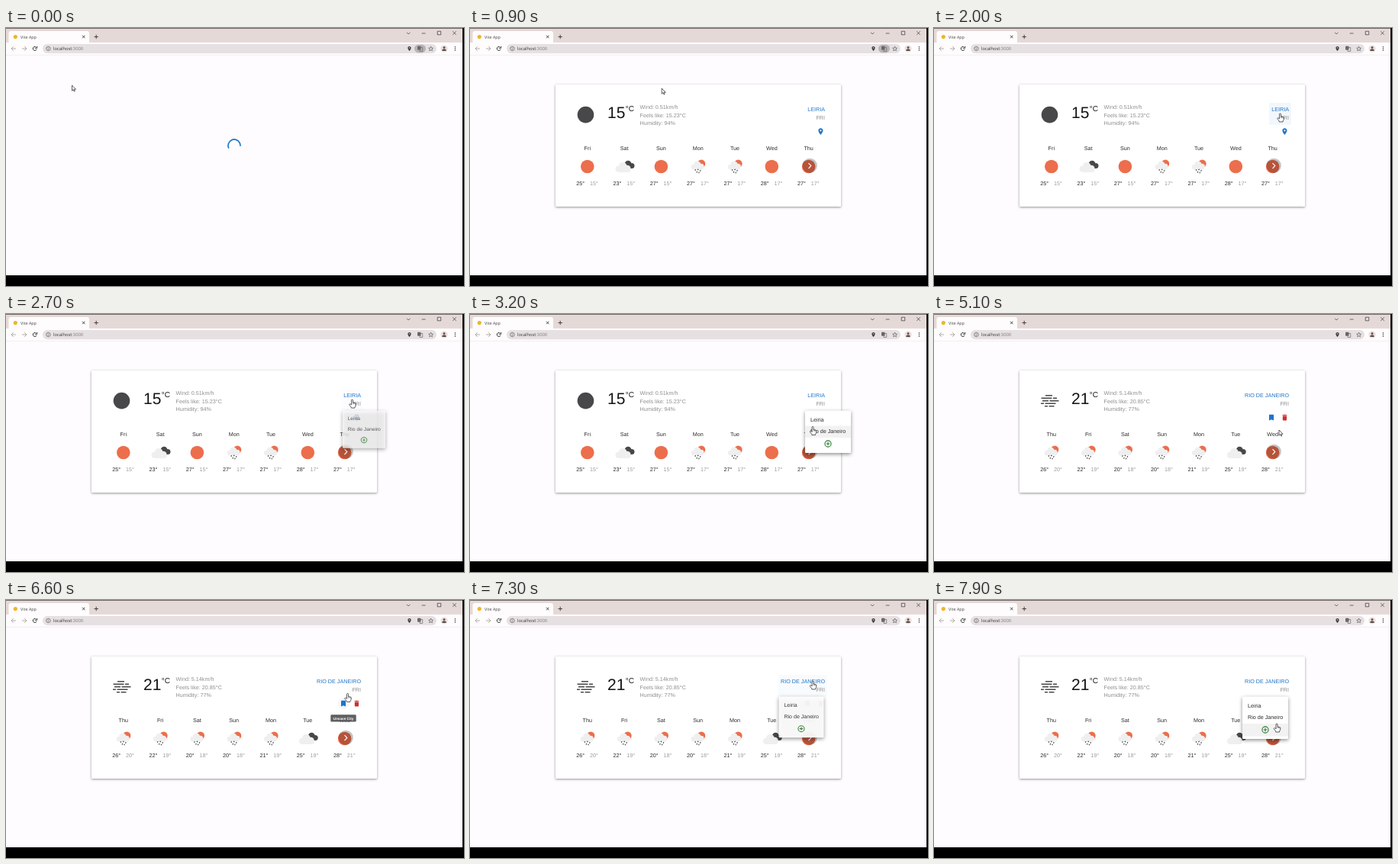
These frames come from a looping animation (600 by 338 pixels, 8 s). An HTML page with a canvas:

```html
<!DOCTYPE html>
<html lang="en">
<head>
<meta charset="utf-8">
<title>Weather</title>
<style>
html, body { margin: 0; width: 100%; height: 100%; overflow: hidden; background: #000; }
canvas { display: block; width: 600px; height: 338px; }
</style>
</head>
<body>
<canvas></canvas>
<script>
const LOOP = 8000, SANS = '"Liberation Sans", Arial, sans-serif', UI = '"Open Sans", sans-serif';
const BLUE = '#1f74c8', SUN = '#ec6e4c', DARK = '#48484a', GREY = '#8e8e90', INK = '#2b2b2d';
const canvas = document.querySelector('canvas'), ctx = canvas.getContext('2d');
const dpr = window.devicePixelRatio || 1;
canvas.width = 600 * dpr;
canvas.height = 338 * dpr;
ctx.textRendering = 'geometricPrecision';

const PIN = new Path2D('M12 2C8.1 2 5 5.1 5 9c0 5.3 7 13 7 13s7-7.7 7-13c0-3.9-3.1-7-7-7zm0 9.5a2.5 2.5 0 0 1 0-5 2.5 2.5 0 0 1 0 5z');
const BOOKMARK = new Path2D('M17 3H7c-1.1 0-2 .9-2 2v16l7-3 7 3V5c0-1.1-.9-2-2-2z');
const TRASH = new Path2D('M6 19c0 1.1.9 2 2 2h8c1.1 0 2-.9 2-2V7H6zM19 4h-3.5l-1-1h-5l-1 1H5v2h14z');
const STAR = new Path2D('M12 3l2.7 6.2 6.8.6-5.1 4.5 1.5 6.6-5.9-3.5-5.9 3.5 1.5-6.6L2.5 9.8l6.8-.6z');
const ARROW = new Path2D('M0 0v7.2l1.7-1.5 1.1 2.4 1-.4-1.1-2.4h2.3z');
const HAND = new Path2D('M-1 1a1 1 0 0 1 2 0v3l3 .7q1 .3.9 1.3l-.5 2.7-.9 1.3v1H-1.2l-.2-1.2-2-2.5q-.7-1 .1-1.5.8-.4 1.5.4l.8.8z');

const cities = [
  { name: 'Leiria', temp: 15, info: ['Wind: 0.51km/h', 'Feels like: 15.23°C', 'Humidity: 94%'], first: 5,
    sky: ['sun', 'cloud', 'sun', 'rain', 'rain', 'sun', 'sun'],
    high: [25, 23, 27, 27, 27, 28, 27], low: [15, 15, 15, 17, 17, 17, 17], left: 439 },
  { name: 'Rio de Janeiro', temp: 21, info: ['Wind: 5.14km/h', 'Feels like: 20.85°C', 'Humidity: 77%'], first: 4,
    sky: ['rain', 'rain', 'rain', 'rain', 'rain', 'cloud', 'sun'],
    high: [26, 22, 20, 20, 21, 25, 28], low: [20, 19, 18, 18, 19, 19, 21], left: 404 },
];
const DAYS = ['Sun', 'Mon', 'Tue', 'Wed', 'Thu', 'Fri', 'Sat'];

// time, x, y of the pointer's hot spot
const path = [
  [100, 86.5, 75], [900, 251, 79], [1800, 453.5, 111], [2000, 453.5, 112], [2700, 453.5, 112],
  [3200, 449, 147.5], [3600, 452, 152], [5100, 452, 152], [5900, 444, 132], [6100, 444, 133],
  [6500, 444, 133], [6600, 447.5, 122.5], [6850, 449, 106], [7350, 449, 106], [7900, 449, 162],
];

const clamp = v => Math.max(0, Math.min(1, v));
const ramp = (t, from, to) => clamp((t - from) / (to - from));
const smooth = v => v * v * (3 - 2 * v);

function pointer(t) {
  const i = path.findIndex(k => k[0] > t);
  if (i === 0) return path[0].slice(1);
  if (i < 0) return path.at(-1).slice(1);
  const [a, b] = [path[i - 1], path[i]], p = ramp(t, a[0], b[0]);
  return [1, 2].map(n => a[n] + (b[n] - a[n]) * p);
}

function text(str, x, y, size, color, align = 'left', family = SANS, weight = 400) {
  ctx.font = `${weight} ${size}px ${family}`;
  ctx.textAlign = align;
  ctx.fillStyle = color;
  ctx.fillText(str, x, y);
}
function rect(x, y, w, h, color, r = 0) {
  ctx.fillStyle = color;
  ctx.beginPath();
  ctx.roundRect(x, y, w, h, r);
  ctx.fill();
}
function disc(x, y, r, color) {
  ctx.fillStyle = color;
  ctx.beginPath();
  ctx.arc(x, y, r, 0, 7);
  ctx.fill();
}
function stroke(d, color, width = 0.8) {
  ctx.strokeStyle = color;
  ctx.lineWidth = width;
  ctx.stroke(new Path2D(d));
}
function ring(x, y, r, color, width = 0.8, from = 0, to = 2 * Math.PI) {
  ctx.strokeStyle = color;
  ctx.lineWidth = width;
  ctx.beginPath();
  ctx.arc(x, y, r, from, to);
  ctx.stroke();
}
function icon(shape, x, y, size, color, outline) {
  ctx.save();
  ctx.translate(x - size / 2, y - size / 2);
  ctx.scale(size / 24, size / 24);
  ctx.fillStyle = ctx.strokeStyle = color;
  ctx.lineWidth = 2;
  outline ? ctx.stroke(shape) : ctx.fill(shape, 'evenodd');
  ctx.restore();
}
function paper(x, y, w, h, blur, alpha) {
  ctx.save();
  ctx.shadowColor = `rgba(0,0,0,${alpha})`;
  ctx.shadowBlur = blur * dpr;
  ctx.shadowOffsetY = blur / 3 * dpr;
  rect(x, y, w, h, '#fff', 1.3);
  ctx.restore();
}

function browser(t) {
  rect(0, 0, 598, 324, '#fefcfe');
  rect(0, 0, 598, 19, '#e5d9d7');
  rect(0, 0, 598, 0.8, '#4a4444');
  rect(3.5, 4, 105.5, 16, '#fefcfd', [3, 3, 0, 0]);
  rect(0, 19, 598, 16.3, '#fefcfd');
  rect(0, 35, 598, 0.6, '#e6e3e5');
  disc(12.3, 11.6, 2.6, '#f0b52c');
  text('Vite App', 19, 13.6, 5.4, '#4a4648', 'left', UI);
  stroke('M100 9.8l3.4 3.4m0-3.4l-3.4 3.4', '#333', 0.9);
  stroke('M115.5 11.5h5.4m-2.7-2.7v5.4', '#333', 0.9);
  stroke('M525 5.8l2.2 2.2 2.2-2.2M544.7 7h4.8M565.2 4.3h4.5v4.5h-4.5zM585.2 4.3l4.6 4.6m0-4.6l-4.6 4.6', '#333', 0.7);
  stroke('M13 27H7m2.8-2.8L7 27l2.8 2.8M21 27h6m-2.8-2.8L27 27l-2.8 2.8', '#a5a1a3', 0.9);
  ring(37.8, 27, 2.5, '#333', 1, 0.4, 5.5);
  stroke('M40.7 23.8v2.6h-2.6', '#333', 0.9);
  rect(48, 21, 516, 12.2, '#e6e0e2', 6.1);
  ring(55.4, 27, 2.7, '#5a5658', 0.7);
  stroke('M55.4 26.6v1.9m0-3.1v.7', '#5a5658', 0.7);
  text('localhost', 62, 29, 5.8, '#333032', 'left', UI);
  const w = ctx.measureText('localhost').width;
  text(':3000', 62 + w, 29, 5.8, '#7d787a', 'left', UI);
  icon(PIN, 528.5, 27, 7.5, '#3c3a3b');
  if (t < 1400) rect(535, 21.8, 15, 10.6, '#b9b3b5', 5.3);
  rect(539, 23.8, 4.5, 5, '#6b6769', 0.7);
  stroke('M542 25.5h3.7v5h-3.7z', '#6b6769', 0.7);
  icon(STAR, 556.6, 27, 7.5, '#4a4648', true);
  disc(574, 27, 4.6, '#eadfdd');
  disc(574, 25.6, 1.4, '#5b4a48');
  rect(571.4, 27.5, 5.2, 2.4, '#5b4a48', [1.8, 1.8, 0, 0]);
  for (const y of [24.8, 27, 29.2]) disc(588.4, y, 0.75, '#444');
}

function spinner(t) {
  const p = (t / 1400 + 0.335) % 1, unit = 2 * Math.PI / 126.9;
  const grow = smooth(clamp(p * 2)), slide = smooth(clamp(p * 2 - 1));
  const skip = 15 * grow + 110 * slide;
  const end = Math.min(126.9, skip + 1 + 99 * grow);
  const turn = p * 2 * Math.PI;
  ring(299, 154, 8, '#1976c8', 1.7, turn + skip * unit, turn + end * unit);
}

function cloud(x, y, s, color) {
  disc(x - 5.5 * s, y + 2 * s, 4 * s, color);
  disc(x, y - 1.5 * s, 5.5 * s, color);
  disc(x + 6 * s, y + 1.5 * s, 4.5 * s, color);
  rect(x - 6 * s, y, 12 * s, 6 * s, color);
}
const weather = {
  sun: c => disc(c, 181.5, 8.8, SUN),
  cloud(c) {
    cloud(c + 5, 179.3, 0.8, DARK);
    cloud(c - 2, 182.8, 1, '#f0eff0');
    rect(c - 9, 184, 17, 5, '#f0eff0', 2);
  },
  rain(c) {
    disc(c + 4.4, 177.8, 5.2, SUN);
    cloud(c - 1, 180.4, 0.85, '#f0eff0');
    for (const [x, y] of [[-3.5, 186], [0, 185.5], [3, 187], [-1.5, 188.7], [1.2, 189.6]])
      stroke(`M${c + x + 0.5} ${y - 0.6}l-.9 1.2`, INK, 1.1);
  },
};

function card(city, hover) {
  paper(112, 74, 374, 160, 3.2, 0.42);
  if (city.temp === 15) disc(151.5, 113.6, 10.8, DARK);
  else stroke('M146 106.7h9M140.5 110.2h14m1.5 0h5M142 113.7h8m1.5 0h12M140 117.2h4m1.5 0h14M145 120.7h4m1.5 0h7', DARK, 1.4);
  text(city.temp, 180, 118.3, 21, '#151517');
  text('°C', 203.8, 109, 10, '#151517');
  city.info.forEach((line, i) => text(line, 222.5, 106 + 10.7 * i, 7.2, GREY));

  rect(city.left, 98, 468 - city.left, 29, `rgba(25,118,210,${0.06 * hover})`, 1.3);
  text(city.name.toUpperCase(), 465, 108.6, 7.2, BLUE, 'right');
  text('FRI', 465, 120.2, 7.2, GREY, 'right');
  if (city.temp === 15) icon(PIN, 459.4, 135.6, 10.5, BLUE);

  city.sky.forEach((sky, i) => {
    const c = 153.8 + 48.3 * i;
    text(DAYS[(city.first + i) % 7], c, 159.6, 7.2, INK, 'center');
    weather[sky](c);
    text(city.high[i] + '°', c - 14.6, 206.3, 7.2, INK);
    text(city.low[i] + '°', c + 3.2, 206.3, 7.2, '#9c9c9e');
  });
  disc(445.2, 180.4, 9.6, 'rgba(0,0,0,.23)');
  stroke('M443.5 177.2l3.3 3.4-3.3 3.4', '#fff', 1.1);
}

function actions(hover, tip) {
  disc(442, 135.6, 7.5, `rgba(25,118,210,${0.05 * hover})`);
  icon(BOOKMARK, 442, 135.6, 10.4, BLUE);
  icon(TRASH, 459.4, 135.6, 10.4, '#d32f2f');
  ctx.globalAlpha = tip;
  rect(425.3, 150.2, 33.4, 9.4, '#5f5f61', 1.3);
  text('Unsave City', 442, 156.6, 4.7, '#fff', 'center', SANS, 700);
  ctx.globalAlpha = 1;
}

function menu(left, open, y) {
  if (!open) return;
  ctx.save();
  ctx.globalAlpha = open;
  ctx.translate(left + 30, 126.5);
  ctx.scale(0.75 + 0.25 * open, 0.56 + 0.44 * open);
  ctx.translate(-left - 30, -126.5);
  paper(left, 126.5, 60, 55.5, 5, 0.45);
  const row = [130.5, 146.5, 162, 178.5], i = row.findIndex((top, n) => y >= top && y < row[n + 1]);
  if (i >= 0) rect(left, row[i], 60, row[i + 1] - row[i], '#f3f2f3');
  cities.forEach((city, n) => text(city.name, left + 7, 140.6 + 15.8 * n, 7.2, INK));
  ring(left + 30, 170, 4.1, '#2e7d32', 1.1);
  stroke(`M${left + 27.7} 170h4.6m-2.3-2.3v4.6`, '#2e7d32', 1.1);
  ctx.restore();
}

function cursor(x, y, hand) {
  ctx.save();
  ctx.translate(x, y);
  const shape = hand ? HAND : ARROW;
  ctx.fillStyle = '#fff';
  ctx.strokeStyle = '#2a2a2c';
  ctx.lineWidth = 0.75;
  ctx.fill(shape);
  ctx.stroke(shape);
  if (hand) stroke('M1 4v2.2M2.5 4.5v1.8M3.9 4.9v1.5', '#2a2a2c', 0.45);
  ctx.restore();
}

function draw() {
  const t = performance.now() % LOOP;
  const [x, y] = pointer(t);
  ctx.setTransform(dpr, 0, 0, dpr, 0, 0);
  rect(0, 0, 600, 338, '#000');
  browser(t);
  if (t < 500 || (t >= 4400 && t < 4800)) spinner(t);
  else if (t < 4400) card(cities[0], ramp(t, 1750, 2000) - ramp(t, 2500, 2750));
  else {
    card(cities[1], ramp(t, 6600, 6850) - ramp(t, 7100, 7500));
    actions(ramp(t, 5600, 5850) - ramp(t, 6600, 6800), ramp(t, 5700, 5900) - ramp(t, 6620, 6800));
  }
  menu(439, smooth(ramp(t, 2500, 2800)) * (1 - ramp(t, 4180, 4400)), y);
  menu(404, smooth(ramp(t, 7050, 7350)), y);
  cursor(x, y, (t > 1700 && t < 4400) || t > 5550);
  requestAnimationFrame(draw);
}
draw();
</script>
</body>
</html>
```
